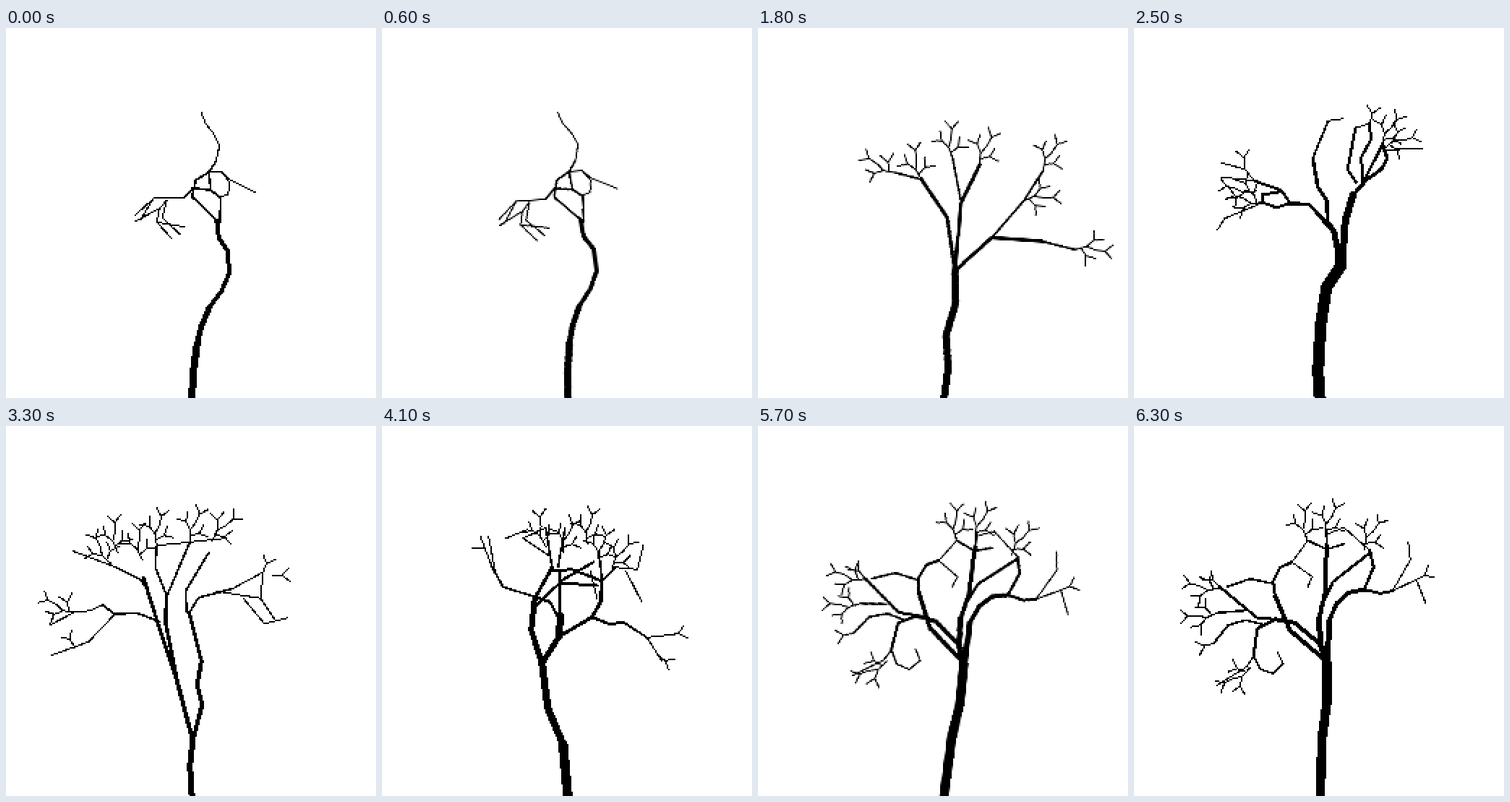
These frames come from a looping animation (512 by 512 pixels, 6.4 s). An HTML page without scripts:

```html
<!DOCTYPE html>
<html lang="en">
<head>
<meta charset="utf-8">
<title>Swaying trees</title>
<style>
html, body { margin: 0; width: 100%; height: 100%; overflow: hidden; background: #fff; }
svg { display: block; width: 100vw; height: 100vh; }
path { fill: none; stroke: #000; stroke-width: 2; stroke-linecap: round; stroke-linejoin: round; shape-rendering: crispEdges; }
.w3 { stroke-width: 3; }
.w4 { stroke-width: 4; }
.w5 { stroke-width: 5; }
.w6 { stroke-width: 6; }
.w8 { stroke-width: 8; }
.w10 { stroke-width: 10; }
.w13 { stroke-width: 13; }
.w16 { stroke-width: 16; }
/* Eight trees take turns; each sways through one cycle of eight steps. */
.tree { visibility: hidden; animation: show 6400ms step-end calc(var(--n) * 800ms - 6400ms) infinite; }
.sway, .right, .left { transform-origin: 257px 508px; }
.sway { animation: sway 800ms step-end infinite; }
/* Trees drawn while leaning are set upright first. */
.right { transform: rotate(-2.83deg); }
.left { transform: rotate(2.83deg); }
@keyframes show {
  0% { visibility: visible; }
  12.5%, 100% { visibility: hidden; }
}
@keyframes sway {
  0%, 50%, 100% { transform: rotate(0deg); }
  12.5%, 37.5% { transform: rotate(2.83deg); }
  25% { transform: rotate(4deg); }
  62.5%, 87.5% { transform: rotate(-2.83deg); }
  75% { transform: rotate(-4deg); }
}
</style>
</head>
<body>
<svg viewBox="0 0 512 512">
<defs>
  <!-- Keeps one sample per 2x2 cell and spreads it over the cell. -->
  <filter id="pixels" filterUnits="userSpaceOnUse" x="0" y="0" width="512" height="512" color-interpolation-filters="sRGB">
    <feFlood x="0" y="0" width="1" height="1"/>
    <feComposite x="0" y="0" width="2" height="2"/>
    <feTile result="grid"/>
    <feComposite in="SourceGraphic" in2="grid" operator="in" result="dots"/>
    <feOffset in="dots" dx="1" result="right"/>
    <feMerge result="row"><feMergeNode in="dots"/><feMergeNode in="right"/></feMerge>
    <feOffset in="row" dy="1" result="below"/>
    <feMerge><feMergeNode in="row"/><feMergeNode in="below"/></feMerge>
  </filter>
  <path id="fork" d="M0 0 2-13-6-24M2-13 12-22"/>
  <g id="spray">
    <path d="M0 0-4-16 1-28"/>
    <use href="#fork" transform="translate(1 -28)"/>
    <use href="#fork" transform="translate(-4 -16) rotate(-50)"/>
    <use href="#fork" transform="translate(-2 -8) rotate(50)"/>
  </g>
</defs>
<g filter="url(#pixels)"><g class="sway">

<g class="tree" style="--n:0">
  <path class="w10" d="M257 516 258 480 264 436"/>
  <path class="w8" d="M264 436 270 412 281 386"/>
  <path class="w6" d="M281 386 298 363 308 340 307 309 294 290 291 266"/>
  <path class="w3" d="M295 270 297 235 283 224 258 221 245 235M291 266 257 233 262 210 280 199 283 224M280 199 290 184"/>
  <path d="M290 184 295 162 287 146 276 132 270 117M280 199 298 199 310 210 344 227M298 199 309 213 307 230 295 233M245 235 204 235 179 258M204 235 186 264M179 267 212 249 222 238M212 249 208 268 229 291M222 238 216 262 240 285M208 268 247 275"/>
</g>

<g class="tree" style="--n:1"><g class="right">
  <path class="w8" d="M258 516 252 483 248 383"/>
  <path class="w6" d="M248 383 262 350 275 307 274 276"/>
  <path class="w4" d="M274 276 265 210M274 276 245 236"/>
  <path class="w3" d="M265 210 247 188 249 155M265 210 282 196M262 220 212 182M245 236 231 228 213 193 184 218M250 240 240 215 212 190"/>
  <path d="M282 196 302 157 300 138M300 143 271 141 249 155M212 182 210 132M212 182 232 150 249 150M212 182 165 155M212 182 165 178M184 218 179 250M184 218 205 232"/>
  <use href="#fork" transform="translate(300 138) rotate(15)"/>
  <use href="#spray" transform="translate(249 155) rotate(10)"/>
  <use href="#spray" transform="translate(206 170) rotate(-10)"/>
  <use href="#spray" transform="translate(193 176) rotate(-45)"/>
  <use href="#spray" transform="translate(190 190) rotate(-85)"/>
  <use href="#fork" transform="translate(180 205) rotate(-110)"/>
  <use href="#fork" transform="translate(253 130) rotate(50)"/>
</g></g>

<g class="tree" style="--n:2">
  <path class="w10" d="M257 516 260 470 254 425 264 380 260 335"/>
  <path class="w5" d="M260 335 308 285 378 286M260 335 244 262 205 212M260 335 262 240 284 186"/>
  <path class="w3" d="M378 286 424 294M308 285 348 232 372 188M262 240 246 180M205 212 168 205"/>
  <use href="#spray" transform="translate(424 294) rotate(85)"/>
  <use href="#spray" transform="translate(372 188) rotate(20)"/>
  <use href="#spray" transform="translate(348 232) rotate(75)"/>
  <use href="#spray" transform="translate(284 186) rotate(15)"/>
  <use href="#spray" transform="translate(246 180) rotate(-10)"/>
  <use href="#spray" transform="translate(168 205) rotate(-70)"/>
  <use href="#spray" transform="translate(205 212) rotate(-20)"/>
</g>

<g class="tree" style="--n:3"><g class="right">
  <path class="w16" d="M257 516 254 475 258 410 266 358 286 328 285 305"/>
  <path class="w10" d="M289 305 292 265 303 230"/>
  <path class="w8" d="M281 305 276 280 264 267"/>
  <path class="w5" d="M303 230 322 209 342 195 350 180 343 160M264 267 242 244 216 242M268 272 266 238 254 220 247 180"/>
  <path class="w4" d="M307 213 295 195 306 138M318 210 343 162M316 212 314 178 327 155 326 131M216 242 196 248 178 241M216 242 203 224 166 211M203 226 177 230 178 241"/>
  <path class="w3" d="M247 180 268 128"/>
  <path d="M268 128 289 125M306 138 326 131M350 168 399 166M178 241 125 263 115 279M166 211 121 206M166 211 153 195 121 186"/>
  <use href="#spray" transform="translate(343 162) rotate(25)"/>
  <use href="#spray" transform="translate(346 166) rotate(65)"/>
  <use href="#fork" transform="translate(326 131) rotate(5)"/>
  <use href="#spray" transform="translate(178 241) rotate(-80)"/>
  <use href="#spray" transform="translate(168 225) rotate(-85)"/>
  <use href="#fork" transform="translate(153 192) rotate(-15)"/>
</g></g>

<g class="tree" style="--n:4"><g class="right">
  <path class="w8" d="M257 516 254 470 258 435"/>
  <path class="w6" d="M258 435 271 385 264 358 270 325M258 435 237 355"/>
  <path class="w5" d="M237 355 212 280 190 210M237 355 220 270 222 235M270 325 253 258"/>
  <path class="w3" d="M253 258 266 237 312 225M250 258 248 228 280 175M212 270 180 258 150 260 133 247M222 235 206 195 208 165M222 235 254 160M197 230 186 212 152 195"/>
  <path d="M312 225 355 202 352 238 371 267M290 228 352 238M133 247 116 255 95 257 60 275M150 260 114 298 62 317M328 238 357 273 389 265M208 165 302 155M152 195 93 173"/>
  <use href="#spray" transform="translate(95 257) rotate(-70)"/>
  <use href="#fork" transform="translate(95 306) rotate(-40)"/>
  <use href="#fork" transform="translate(355 202) rotate(15)"/>
  <use href="#fork" transform="translate(368 206) rotate(80)"/>
  <use href="#spray" transform="translate(145 190) rotate(-35)"/>
  <use href="#spray" transform="translate(154 174) rotate(-10)"/>
  <use href="#spray" transform="translate(188 185) rotate(-10)"/>
  <use href="#spray" transform="translate(208 165) rotate(5)"/>
  <use href="#spray" transform="translate(254 160) rotate(15)"/>
  <use href="#spray" transform="translate(285 158) rotate(40)"/>
</g></g>

<g class="tree" style="--n:5"><g class="right">
  <path class="w13" d="M257 516 250 440"/>
  <path class="w10" d="M250 440 229 390 221 328M245 290 246 262"/>
  <path class="w8" d="M221 328 206 282 211 238M221 328 245 290"/>
  <path class="w5" d="M211 238 235 195M246 262 245 200M246 290 290 264 302 243 304 214"/>
  <path class="w4" d="M242 262 232 243 211 236M290 264 313 273 335 272M211 250 245 217 297 220M235 200 262 198 304 214M245 215 292 188"/>
  <path class="w3" d="M211 236 167 222 152 195M335 272 366 292M235 195 226 140M243 195 253 140M304 214 300 175M304 214 322 195"/>
  <path d="M152 195 136 153M142 168 124 168M157 205 147 153M366 292 404 288M366 292 387 325M232 180 195 155 226 140M171 155 200 143M322 195 353 198 361 165M337 200 359 243M288 200 297 238"/>
  <use href="#fork" transform="translate(397 289) rotate(70)"/>
  <use href="#fork" transform="translate(381 317) rotate(115)"/>
  <use href="#spray" transform="translate(226 166) rotate(-15)"/>
  <use href="#spray" transform="translate(250 175) rotate(15)"/>
  <use href="#spray" transform="translate(284 163) rotate(5)"/>
  <use href="#spray" transform="translate(300 190) rotate(10)"/>
  <use href="#spray" transform="translate(318 197) rotate(30)"/>
</g></g>

<g class="tree" style="--n:6"><g class="right">
  <path class="w8" d="M257 516 262 470 267 410"/>
  <path class="w6" d="M267 410 264 382 271 355 266 330"/>
  <path class="w4" d="M266 330 248 305 250 280 278 242 274 195"/>
  <path class="w3" d="M274 195 282 176M278 242 302 236 313 214 308 195"/>
  <path d="M308 195 319 178 313 160 301 147 285 149M326 118 309 131 301 147 288 160 282 176 272 160 253 150 253 130 257 117"/>
</g></g>

<g class="tree" style="--n:7"><g class="left">
  <path class="w13" d="M257 516 260 430 266 385 266 325"/>
  <path class="w8" d="M266 330 257 300 256 265M268 325 269 270"/>
  <path class="w6" d="M256 265 264 230 266 165M269 270 280 245 297 230 318 226M262 322 215 282 195 235M258 302 222 272 195 267"/>
  <path class="w4" d="M318 226 331 195 326 172M318 226 340 231 357 228M258 250 275 215 326 175M195 267 170 265 118 222M195 235 192 215 202 195 218 188M195 267 170 280 165 318"/>
  <path class="w3" d="M194 218 160 211 128 222M180 275 155 268 130 275 110 300M165 318 174 336M152 255 115 258M266 145 266 170 240 158M266 170 290 163"/>
  <path d="M357 228 390 212 403 244M357 228 382 185 379 160M174 336 192 342 206 328 198 313M240 158 218 188 246 208 240 222M165 318 155 333 115 358M326 172 290 140 265 150"/>
  <use href="#fork" transform="translate(390 212) rotate(55)"/>
  <use href="#fork" transform="translate(118 222) rotate(-55)"/>
  <use href="#spray" transform="translate(118 224) rotate(-85)"/>
  <use href="#spray" transform="translate(115 258) rotate(-100)"/>
  <use href="#fork" transform="translate(110 300) rotate(-115)"/>
  <use href="#spray" transform="translate(160 334) rotate(-125)"/>
  <use href="#spray" transform="translate(240 158) rotate(-10)"/>
  <use href="#spray" transform="translate(265 152) rotate(15)"/>
  <use href="#spray" transform="translate(318 170) rotate(25)"/>
</g></g>

</g></g>
</svg>
</body>
</html>
```
